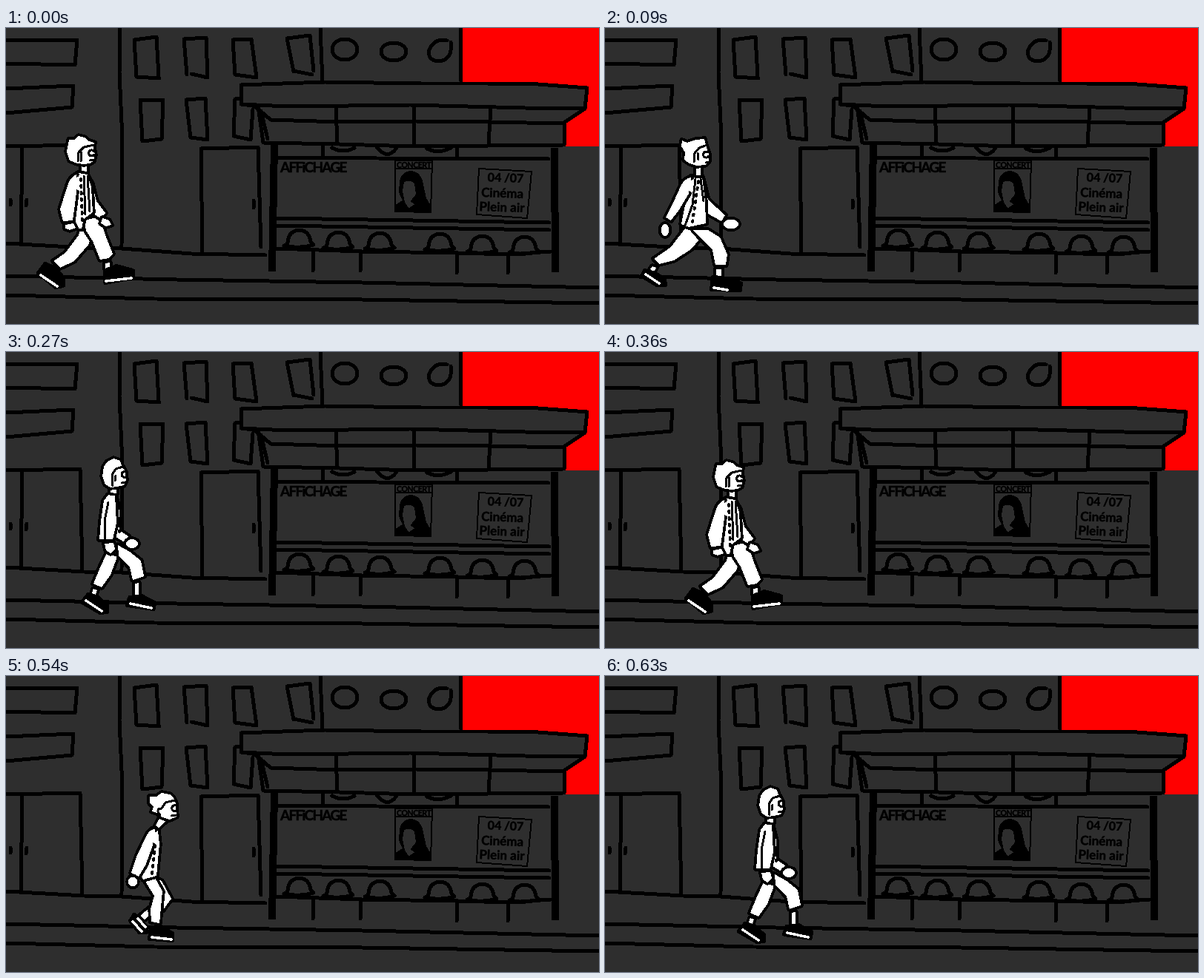
Write an HTML page that moves like this. It is 800x400 px and loops after 720 ms.

```html
<!DOCTYPE html>
<html lang="fr">
<head>
<meta charset="utf-8">
<title>Walk past the bus shelter</title>
<style>
  html, body { margin: 0; height: 100%; overflow: hidden; background: #2e2e2e; }
  svg { display: block; width: 100vw; height: 100vh; }
  path, ellipse { stroke: #000; stroke-width: 5; stroke-linecap: round; stroke-linejoin: round; shape-rendering: crispEdges; }
  #street path, #street ellipse, #seat { fill: none; }
  #street .fill { fill: #2e2e2e; }
  #street .thin { stroke-width: 2; }
  #street .dark { fill: #000; stroke-width: 2; }
  #street .post { stroke-width: 10; stroke-linecap: butt; }
  text { font-family: Lato, "Open Sans", sans-serif; font-weight: 700; stroke: #000; stroke-width: .5; }
  .pose path, .pose ellipse { fill: #fff; stroke-width: 7.5; paint-order: stroke; }
  .pose .shoe { fill: #000; stroke-width: 6; }
  .pose .ink { fill: none; stroke-width: 3; }
  .pose .sole { fill: none; stroke: #fff; stroke-width: 3.5; }
  .pose .dots { fill: none; stroke-width: 4; stroke-dasharray: 2 7; }
</style>
</head>
<body>
<svg viewBox="0 0 800 400">
  <defs>
    <path id="seat" d="M-20 8Q-16 7-15 4Q-14-12 1-13Q14-12 16 3L20 7Q0 13-20 8Z"/>

    <g id="pose0" class="pose">
      <path d="M103 260L98 280L80 304L64 315L73 324L92 315L111 293L119 272Z"/>
      <path d="M106 260L126 255L134 280L144 305L139 311L127 313L117 288L108 274Z"/>
      <path d="M134 318L140 317L140 325L134 326Z"/>
      <path class="shoe" d="M53 319L44 331L67 350L77 348L77 338L67 325Z"/>
      <path class="shoe" d="M134 328L149 322L171 328L171 337L134 344Z"/>
      <path class="sole" d="M47 334L69 349M135 342L169 338"/>
      <path d="M110 200L116 210L122 234L134 250L128 258L117 250L108 230Z"/>
      <path d="M130 257L139 260L142 266L135 268L128 264Z"/>
      <path d="M97 196L109 196L115 215L117 249L105 258L102 271L82 270L75 252L85 208Z"/>
      <path d="M95 198Q86 201 82 216L73 245L77 261L90 260L93 238L95 222"/>
      <path d="M80 266L91 264L94 270L86 273L80 271Z"/>
      <path class="ink" d="M110 200L113 248M105 200L107 252"/>
      <path class="dots" d="M101 204L103 262"/>
      <path d="M102 184L109 184L109 194L102 193Z"/>
      <path d="M85 151L92 151L98 146L106 148L112 153L119 155L118 162L120 171L118 180L113 183L105 184L96 183L86 179L82 167Z"/>
      <path class="ink" d="M97 180L98 168L105 161L119 158M102 168L101 180M119 167A4 4 0 1 0 119 171M113 179L119 178"/>
    </g>

    <g id="pose1" class="pose">
      <path d="M180 277L161 302L138 318L145 325L165 320L188 305L206 284Z"/>
      <path d="M191 279L211 279L227 289L237 312L235 326L221 326L217 306L201 290Z"/>
      <path d="M136 328L141 330L138 336L133 332ZM222 332L229 332L229 341L222 341Z"/>
      <path class="shoe" d="M126 334L122 341L142 353L153 353L152 346L140 338Z"/>
      <path class="shoe" d="M218 343L230 344L255 351L254 360L216 359Z"/>
      <path class="sole" d="M127 339L145 351M219 357L237 360"/>
      <path d="M204 210L211 238L234 259L229 267L211 257Z"/>
      <ellipse cx="242" cy="271" rx="10" ry="6.5"/>
      <path d="M188 207L203 207L207 240L208 270L185 275L175 271L182 235Z"/>
      <path d="M188 208Q180 209 175 218L165 240L154 262L161 266L171 253L185 230"/>
      <ellipse cx="153" cy="279" rx="5.5" ry="8"/>
      <path class="ink" d="M201 210L205 240M194 210L190 245L180 273"/>
      <path class="dots" d="M198 213L190 268"/>
      <path d="M195 193L201 193L201 205L195 205Z"/>
      <path d="M176 158L183 161L194 157L206 156L208 164L212 176L212 186L207 191L196 192L186 189L179 184L180 174L175 166Z"/>
      <path class="ink" d="M192 187L193 175L199 168L210 164M197 175L198 184M211 174A4 4 0 1 0 212 179M208 188L213 187"/>
    </g>

    <g id="pose2" class="pose">
      <path d="M121 266L130 270L143 294L132 309L127 300Z"/>
      <path d="M114 306L101 317L107 322L117 313Z"/>
      <path class="shoe" d="M93 316L88 324L100 339L109 339L109 332Z"/>
      <path class="sole" d="M91 325L103 338M98 321L108 332"/>
      <path d="M107 269L120 264L131 284L127 327L116 325L115 308L120 290Z"/>
      <path class="shoe" d="M116 333L129 332L144 341L144 350L114 348Z"/>
      <path class="sole" d="M117 346L143 349"/>
      <path d="M117 200L125 202L127 220L123 263L105 268L101 261Z"/>
      <path d="M121 200Q114 200 110 208L97 235L89 259L99 264L108 249L118 222"/>
      <ellipse cx="91" cy="271" rx="6" ry="6.5"/>
      <path class="dots" d="M121 222L117 262"/>
      <path d="M129 182L137 188L126 198L122 195Z"/>
      <path d="M114 156L123 156L130 151L141 153L146 158L149 165L150 183L141 187L131 184L124 178L117 176L119 170L114 165Z"/>
      <path class="ink" d="M128 181Q121 172 130 172L135 164L148 161M149 168A4 4 0 1 0 150 175M143 182L149 181"/>
    </g>

    <g id="pose3" class="pose">
      <path d="M214 279L205 298L196 320L207 325L219 308L228 284Z"/>
      <path d="M229 268L245 277L260 289L264 310L249 315L245 298L230 282Z"/>
      <path d="M196 327L201 329L199 335L194 333ZM252 320L257 319L257 335L252 337Z"/>
      <path class="shoe" d="M189 335L181 345L205 359L214 358L214 350L202 339Z"/>
      <path class="shoe" d="M245 339L261 337L278 346L277 354L242 349Z"/>
      <path class="sole" d="M186 343L207 357M246 347L274 353"/>
      <path d="M226 202L231 222L231 248L243 256L236 263L223 255Z"/>
      <ellipse cx="248" cy="266" rx="8" ry="6"/>
      <path d="M216 200L225 201L227 238L222 260L204 260L206 235L210 208Z"/>
      <path d="M211 266L223 265L225 273L219 279L213 275Z"/>
      <path class="ink" d="M216 210L211 235L211 260"/>
      <path class="dots" d="M228 222L231 250"/>
      <path d="M219 187L227 188L227 198L219 197Z"/>
      <path d="M210 162L215 155L223 151L232 154L234 160L239 169L240 180L237 187L228 189L219 190L212 186L208 175Z"/>
      <path class="ink" d="M222 188L221 173L226 165L236 162M226 174L225 181M240 169A4 4 0 1 0 240 176M234 184L240 183"/>
    </g>
  </defs>

  <g id="street">
    <rect width="800" height="400" fill="#2e2e2e"/>
    <rect x="615" width="185" height="160" fill="#f00"/>
    <!-- buildings -->
    <path d="M0 17L96 16L93 50L0 48M0 82L91 78L89 107L0 115"/>
    <path d="M154 0L153 60L157 150L156 295M424 0L427 73M613 0L614 72"/>
    <path d="M207 68L176 66L173 16L203 12L206 66M250 62L272 67L270 13L240 15L244 63M309 63L338 67L331 15L306 16L309 63M388 59L379 14L410 10L415 58M388 58L413 63"/>
    <path d="M184 153L181 97L212 97L210 150L184 153M249 148L243 97L269 95L272 151L249 148M318 95L309 96L307 146L330 151L333 110"/>
    <ellipse cx="457" cy="29" rx="17" ry="14"/>
    <ellipse cx="523" cy="32" rx="17" ry="12"/>
    <path d="M595 17Q579 13 571 29Q568 44 584 45Q603 43 600 19"/>
    <path d="M0 160L100 158L103 294M22 160L20 291M6 232L6 239M28 232L27 240"/>
    <path d="M265 304L263 163L340 161L344 296M334 233L334 243"/>
    <path d="M0 291L105 297L156 298L250 305L350 307"/>
    <path d="M0 335L230 340L480 344L800 351M0 361L200 366L480 367L800 372"/>
    <!-- shelter roof -->
    <path class="fill" d="M317 77L430 73L560 75L650 75L718 76L784 81L781 109L754 127L753 158L550 160L450 157L347 155L340 106L317 103Z"/>
    <path d="M317 103L380 106L545 104L700 108L781 109M336 106L357 124L450 127L552 126L650 127L754 129M344 112L353 150M445 106L447 157M550 104L551 158M654 108L651 157"/>
    <!-- glass, bench and posts -->
    <path d="M427 158L427 173M608 160L608 175M440 162Q455 170 470 162M501 162Q515 179 527 162M568 163Q583 171 600 162"/>
    <path d="M364 175L500 176L732 177M364 257L733 263M364 267L733 273"/>
    <path d="M364 298L480 302L610 304L680 306L735 302M415 302L414 328M479 302L478 328M609 305L608 331M677 308L677 331"/>
    <use href="#seat" x="395" y="286"/>
    <use href="#seat" x="448" y="289"/>
    <use href="#seat" x="504" y="290"/>
    <use href="#seat" x="585" y="291"/>
    <use href="#seat" x="642" y="294"/>
    <use href="#seat" x="699" y="295"/>
    <path class="post" d="M362 156L359 329M740 162L741 330"/>
    <!-- notices -->
    <text x="370" y="195" font-size="19" letter-spacing="-1.7">AFFiCHAGE</text>
    <path class="thin" d="M525 179L575 179L573 249L525 248ZM525 190L574 190"/>
    <text x="527" y="189" font-size="10.5" letter-spacing="-.4">CONCERT</text>
    <path class="dark" d="M532 207Q535 194 547 194Q560 196 562 212L566 230L572 240V248H526V240L536 233L531 222Z"/>
    <path class="fill thin" d="M536 208Q544 202 552 210L554 225L547 234L553 238L543 245L537 236L534 220Z"/>
    <path class="thin" d="M638 190L709 194L703 257L635 252Z"/>
    <g transform="rotate(2 670 225)">
      <text x="649" y="208" font-size="16">04 /07</text>
      <text x="641" y="229" font-size="17">Cinéma</text>
      <text x="639" y="248" font-size="17">Plein air</text>
    </g>
  </g>
  <use id="walker"/>
</svg>
<script>
  const STEP = 90;
  // Offset of each of the eight steps; the four poses repeat twice.
  const offsets = [[0, 0], [-72, -6], [0, 0], [-78, -7], [66, 2], [0, 0], [80, 7], [0, 0]];
  const walker = document.getElementById("walker");

  function draw(now) {
    const step = Math.floor(now / STEP) % offsets.length;
    walker.setAttribute("href", "#pose" + step % 4);
    walker.setAttribute("transform", `translate(${offsets[step]})`);
  }

  const start = performance.now();
  function tick() {
    draw(performance.now() - start);
    requestAnimationFrame(tick);
  }
  tick();
</script>
</body>
</html>
```
